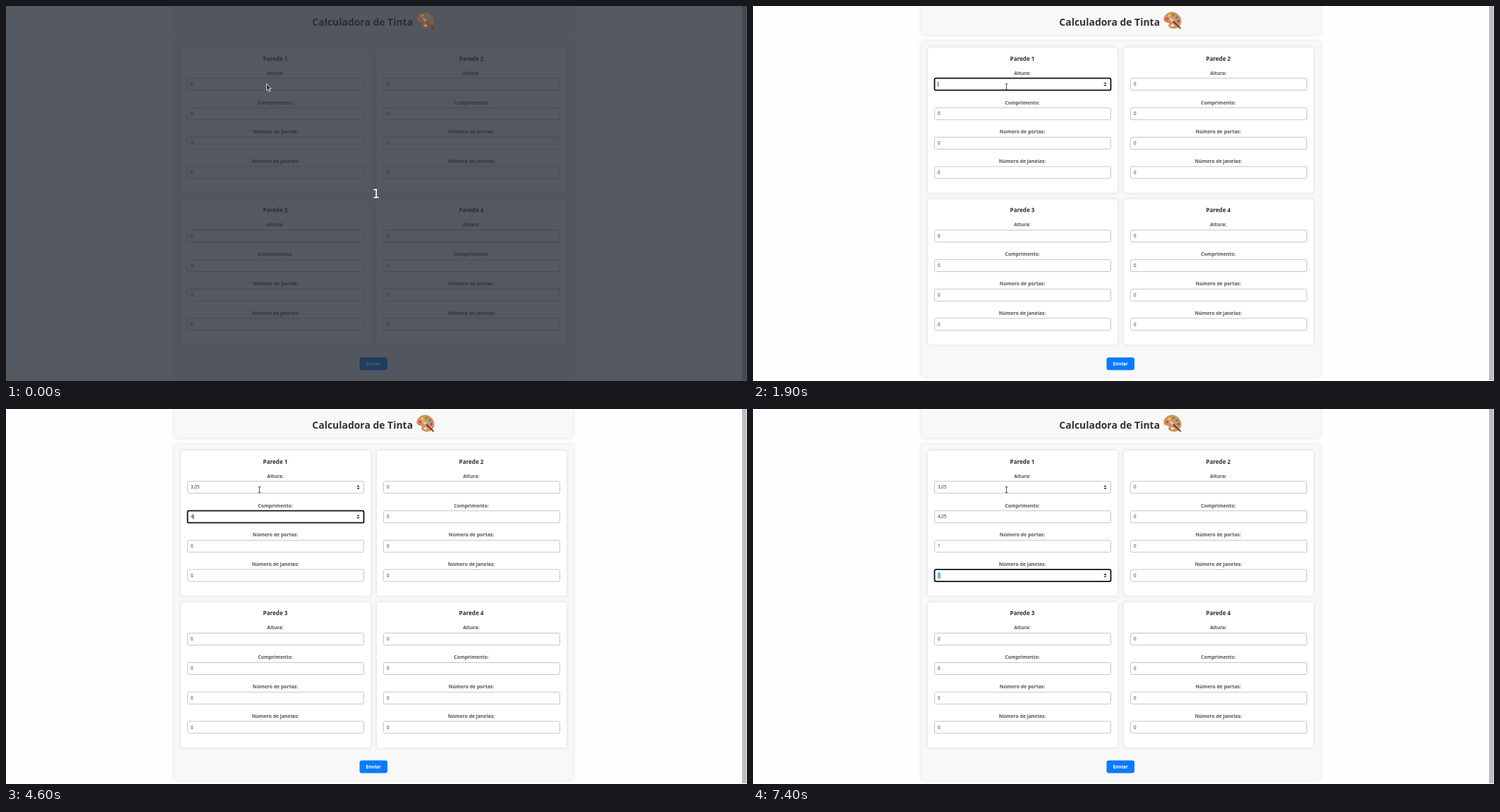
Recreate the animation shown at these times as an HTML page with a canvas. Size 1051 px wide and 533 px high, loop 8 s.

```html
<!DOCTYPE html>
<html lang="pt">
<head>
<meta charset="utf-8">
<title>Calculadora de Tinta</title>
<style>
  html, body { margin: 0; width: 100%; height: 100%; overflow: hidden; background: #fefefe; }
  canvas { display: block; }
</style>
</head>
<body>
<canvas id="stage" width="1051" height="533"></canvas>
<script>
const LOOP = 8000;
const FONT = '"Noto Sans", "Open Sans", sans-serif';
const ctx = document.getElementById('stage').getContext('2d');

const LABELS = ['Altura:', 'Comprimento:', 'Número de portas:', 'Número de janelas:'];
const ROW_Y = [111.2, 153.2, 195, 236.6];
const PANEL_DX = 278, PANEL_DY = 215.8;
const INPUT_X = 257.5, INPUT_W = 250, INPUT_H = 17, TEXT_X = 262;

// Each entry: start time, focused row, its text, caret state ('on', 'off' or 'all' for a selection)
const STEPS = [
  [0, -1, '0', 'off'],
  [600, 0, '0', 'off'],
  [700, 0, '0', 'on'],
  [1300, 0, '0', 'off'],
  [1700, 0, '', 'off'],
  [1900, 0, '', 'on'],
  [2500, 0, '', 'off'],
  [2600, 0, '3', 'on'],
  [2900, 0, '3,', 'on'],
  [3100, 0, '3,0', 'on'],
  [3300, 0, '3,05', 'on'],
  [3600, 1, '0', 'all'],
  [4600, 1, '4', 'on'],
  [5000, 1, '4,', 'on'],
  [5200, 1, '4,0', 'on'],
  [5300, 1, '4,05', 'on'],
  [5800, 2, '0', 'all'],
  [6700, 2, '1', 'on'],
  [7300, 2, '1', 'off'],
  [7400, 3, '0', 'all']
];

function box(x, y, w, h, r, fill, stroke, line = 1) {
  ctx.beginPath();
  ctx.roundRect(x, y, w, h, r);
  if (fill) {
    ctx.fillStyle = fill;
    ctx.fill();
  }
  if (stroke) {
    ctx.strokeStyle = stroke;
    ctx.lineWidth = line;
    ctx.stroke();
  }
}

function shadowBox(x, y, w, h, r, fill) {
  ctx.save();
  ctx.shadowColor = 'rgba(0,0,0,0.13)';
  ctx.shadowBlur = 5;
  box(x, y, w, h, r, fill);
  ctx.restore();
}

function text(str, x, y, size, weight, color, align = 'center') {
  ctx.font = `${weight} ${size}px ${FONT}`;
  ctx.textAlign = align;
  ctx.fillStyle = color;
  ctx.fillText(str, x, y);
}

function shape(points, fill) {
  ctx.beginPath();
  points.forEach(([x, y]) => ctx.lineTo(x, y));
  ctx.closePath();
  ctx.fillStyle = fill;
  ctx.fill();
}

function dot(x, y, rx, ry, fill) {
  ctx.beginPath();
  ctx.ellipse(x, y, rx, ry, 0, 0, Math.PI * 2);
  ctx.fillStyle = fill;
  ctx.fill();
}

function palette() {
  ctx.save();
  ctx.translate(582, 8);
  ctx.beginPath();
  ctx.moveTo(1, 10);
  ctx.bezierCurveTo(2, 3, 10, -0.5, 16, 1.5);
  ctx.bezierCurveTo(23, 4, 27, 12, 24, 18);
  ctx.bezierCurveTo(22, 24, 14, 25, 9, 22);
  ctx.bezierCurveTo(6, 20, 10, 17, 7.5, 15.5);
  ctx.bezierCurveTo(4, 14.5, 0.5, 15, 1, 10);
  ctx.fillStyle = '#dc9358';
  ctx.fill();
  ctx.strokeStyle = '#b9703f';
  ctx.lineWidth = 0.8;
  ctx.stroke();
  dot(5.3, 10.5, 2, 1.9, '#e8483c');
  dot(8.5, 5.8, 2, 1.8, '#f6c944');
  dot(14.3, 4.7, 2, 1.7, '#4f9e50');
  dot(19.3, 8.2, 1.9, 1.9, '#438dc4');
  dot(21.3, 13.6, 1.7, 2, '#8b4f9b');
  dot(13, 19.5, 2, 1.5, '#fff4e4');
  shape([[11.5, 11], [15, 13], [25.3, 23.4], [24, 24.8], [13.4, 15]], '#70432f');
  shape([[8.5, 8.5], [12.5, 10], [15.2, 12.8], [13.2, 14.8], [10.2, 12.5]], '#b6d7e5');
  ctx.restore();
}

function spinner(y) {
  shape([[499.5, y - 3], [501.7, y - 0.7], [497.3, y - 0.7]], '#333');
  shape([[499.5, y + 3], [501.7, y + 0.7], [497.3, y + 0.7]], '#333');
}

function input(x, y, value, focus, caret) {
  const top = y - INPUT_H / 2;
  box(x, top, INPUT_W, INPUT_H, 2, '#fff', focus ? '#111' : '#c6c6c6', focus ? 1.8 : 1);
  const tx = x + TEXT_X - INPUT_X;
  const selected = focus && caret === 'all';
  if (selected) box(tx, y - 3.8, 3.7, 7.6, 0, '#2f8fe8');
  text(value, tx, y + 2.2, 6.2, 400, selected ? '#fff' : '#333', 'left');
  if (focus && caret === 'on') {
    box(tx + ctx.measureText(value).width, y - 3.5, 0.8, 7, 0, '#111');
  }
}

function panel(index, step) {
  const dx = (index % 2) * PANEL_DX;
  const dy = Math.floor(index / 2) * PANEL_DY;
  const [, row, value, caret] = step;
  const done = ['3,05', '4,05', '1'];
  shadowBox(248 + dx, 59 + dy, 269, 206.5, 4, '#fff');
  text('Parede ' + (index + 1), 382 + dx, 77.5 + dy, 8.1, 700, '#333');
  LABELS.forEach((label, i) => {
    const y = ROW_Y[i] + dy;
    const focus = index === 0 && i === row;
    const shown = focus ? value : index === 0 && i < row ? done[i] : '0';
    text(label, 382 + dx, y - 13.7, 6.88, 700, '#555');
    input(INPUT_X + dx, y, shown, focus, caret);
  });
}

function page(step) {
  ctx.fillStyle = '#fefefe';
  ctx.fillRect(0, 0, 1051, 533);
  shadowBox(238.5, -10, 566, 51, 4, '#f8f8f8');
  shadowBox(238.5, 50, 566, 477, 4, '#f8f8f8');
  text('Calculadora de Tinta', 505.7, 27.8, 13.95, 700, '#333');
  palette();
  for (let i = 0; i < 4; i++) panel(i, step);
  box(501.5, 499.5, 39.5, 18, 3, '#087bff');
  text('Enviar', 521.2, 511, 6.8, 600, '#fff');
  ctx.fillStyle = '#bebebe';
  ctx.fillRect(1044, 0, 6.5, 532);
}

function countdown() {
  ctx.fillStyle = 'rgba(39,44,54,0.79)';
  ctx.fillRect(0, 0, 1051, 533);
  ctx.globalAlpha = 0.35;
  palette();
  ctx.globalAlpha = 1;
  ctx.font = '17px "DejaVu Sans", sans-serif';
  ctx.textAlign = 'center';
  ctx.fillStyle = '#fff';
  ctx.fillText('1', 524.8, 272.7);
}

function arrow(x, y) {
  ctx.save();
  ctx.translate(x, y);
  shape([[0, 0], [0, 9.4], [2.1, 7.6], [3.8, 11], [5.2, 10.3], [3.7, 7], [6.4, 6.7]], '#22252a');
  ctx.strokeStyle = '#f2f2f2';
  ctx.lineWidth = 0.9;
  ctx.stroke();
  ctx.restore();
}

function beam(x, y) {
  ctx.strokeStyle = '#555';
  ctx.lineWidth = 1;
  ctx.beginPath();
  ctx.moveTo(x - 2, y - 4);
  ctx.lineTo(x + 2, y - 4);
  ctx.moveTo(x, y - 4);
  ctx.lineTo(x, y + 4);
  ctx.moveTo(x - 2, y + 4);
  ctx.lineTo(x + 2, y + 4);
  ctx.stroke();
}

function draw(t) {
  page(STEPS.findLast(s => s[0] <= t));
  if (t < 100) {
    countdown();
    arrow(369.6, 110.7);
    return;
  }
  const focus = STEPS.findLast(s => s[0] <= t)[1];
  spinner(ROW_Y[0]);
  if (focus > 0) spinner(ROW_Y[focus]);
  beam(t < 200 ? 361.5 : 359.5, 114.8);
}

const start = performance.now();
function tick() {
  draw((performance.now() - start) % LOOP);
  requestAnimationFrame(tick);
}
tick();
</script>
</body>
</html>
```
